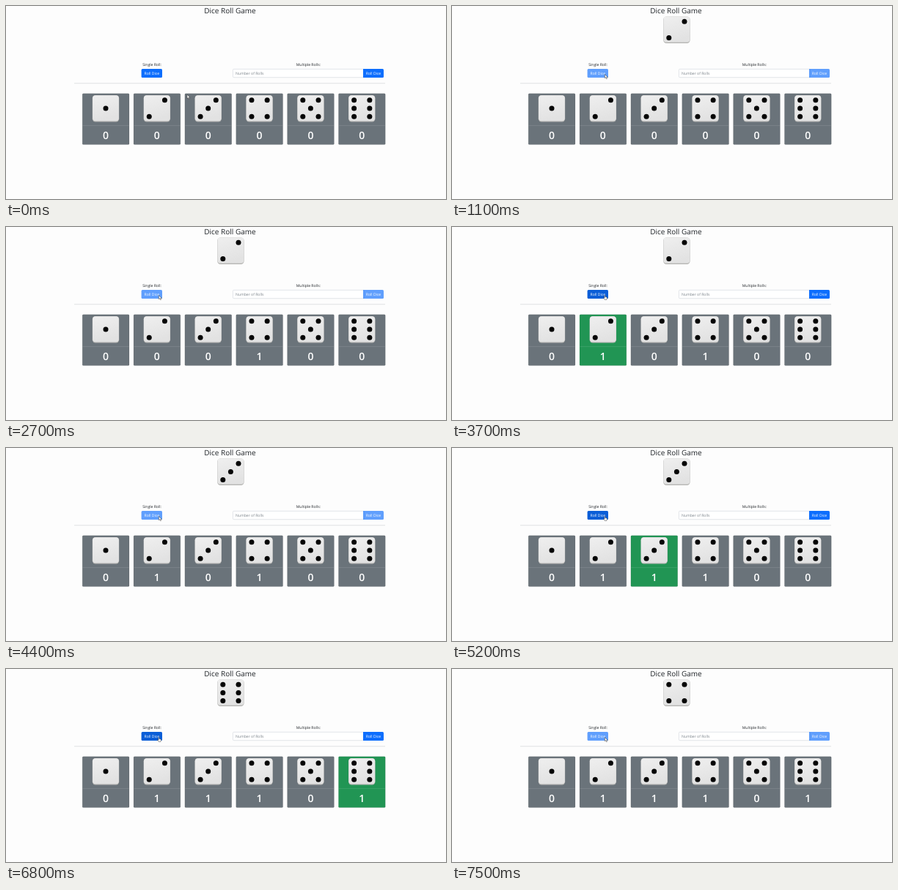
An HTML page for the animation above (7.6 s loop, 600 px wide and 264 px high).

```html
<!DOCTYPE html>
<html lang="en">
<head>
<meta charset="utf-8">
<title>Dice Roll Game</title>
<style>
  html, body { margin: 0; width: 100%; height: 100%; overflow: hidden; background: #fdfdfd; }
  svg { display: block; width: 600px; height: 264px; }
  text {
    font-family: "Open Sans", "Noto Sans", sans-serif;
    font-size: 5.1px;
    fill: #212529;
    text-anchor: middle;
    text-rendering: geometricPrecision;
  }
  .title { font-size: 10px; font-weight: 500; }
  .hint { fill: #7b838a; text-anchor: start; }
  .btn text { fill: #fff; }
  .count { font-size: 14px; font-weight: 600; fill: #fff; }
</style>
</head>
<body>
<svg id="stage" viewBox="0 0 600 264">
  <defs>
    <linearGradient id="face" x1="0" y1="0" x2="0.3" y2="1">
      <stop offset="0" stop-color="#efefef"/>
      <stop offset="1" stop-color="#e2e2e2"/>
    </linearGradient>
  </defs>
  <text class="title" x="305.5" y="10">Dice Roll Game</text>
  <text x="199" y="82.2">Single Roll:</text>
  <text x="412.3" y="82.2">Multiple Rolls:</text>
  <path d="M93 105.8H517" stroke="#d9dadb" stroke-width="0.8"/>
  <rect x="309.4" y="86.3" width="179" height="11.4" rx="1.4" fill="#fff" stroke="#ced4da" stroke-width="0.6"/>
  <text class="hint" x="313" y="93.9">Number of Rolls</text>
  <g class="btn" id="single">
    <rect x="184.6" y="86" width="28.4" height="12" rx="1.5"/>
    <text x="198.8" y="93.9">Roll Dice</text>
  </g>
  <g class="btn" id="multi">
    <path d="M487 86H513.5a1.5 1.5 0 0 1 1.5 1.5V96.5a1.5 1.5 0 0 1 -1.5 1.5H487Z"/>
    <text x="501" y="93.9">Roll Dice</text>
  </g>
  <g id="cards"></g>
  <g id="top"></g>
  <g id="pointer" stroke="#222" stroke-width="0.45" stroke-linejoin="round" fill="#fff">
    <path id="arrow" d="M0 0V5.4L1.3 4.3L2.2 6.3L3.1 5.9L2.2 4H3.9Z"/>
    <path id="hand" d="M-.5 .2Q0 -.4 .5 .2V2.2L2.6 2.7Q3.2 2.9 3.1 3.6L2.6 6H-.3L-1.9 3.9Q-1.6 3.2 -.5 3.9Z"/>
  </g>
</svg>
<script>
const LOOP = 7600, STEP = 100, FADE = 150, LEAD = 80;
const BLUE = [13, 110, 253], HOVER = [11, 94, 215];

// start and end in ms, one rolled face per step; the last face is the result
const rolls = [
  { start: 800,  end: 2000, faces: "516253113654" },
  { start: 2300, end: 3400, faces: "63512461532" },
  { start: 3800, end: 5000, faces: "51426135243" },
  { start: 5300, end: 6400, faces: "51446325136" },
  { start: 6900, end: 9999, faces: "2513654" }
];

const pips = {
  1: [[0, 0]],
  2: [[1, -1], [-1, 1]],
  3: [[1, -1], [0, 0], [-1, 1]],
  4: [[-1, -1], [1, -1], [-1, 1], [1, 1]],
  5: [[-1, -1], [1, -1], [0, 0], [-1, 1], [1, 1]],
  6: [[-1, -1], [1, -1], [-1, 0], [1, 0], [-1, 1], [1, 1]]
};

const el = id => document.getElementById(id);
const clamp = v => Math.max(0, Math.min(1, v));
const ease = v => v * v * (3 - 2 * v);
const mix = (a, b, k) => a + (b - a) * k;

function die(n, x, y) {
  const dots = pips[n].map(([px, py]) =>
    `<circle cx="${px * 10.6}" cy="${py * 11.2}" r="3.5" fill="#050505"/>`).join("");
  return `<g transform="translate(${x} ${y})">
    <rect x="-18.2" y="-18" width="36.4" height="36.5" rx="4.2" fill="#b9b9b7"/>
    <rect x="-17.9" y="-17.8" width="35.8" height="35" rx="4" fill="url(#face)"/>${dots}</g>`;
}

function card(n) {
  const x = 104 + (n - 1) * 69.85, mid = x + 32;
  return `<g>
    <rect class="bg" x="${x + .2}" y="119.7" width="63.8" height="69.9" rx="1.4" stroke="#000" stroke-opacity=".16" stroke-width=".6"/>
    <path d="M${x + .5} 163.6h63.2" stroke="#fff" stroke-opacity=".16" stroke-width=".7"/>
    ${die(n, mid, 140)}
    <text class="count" x="${mid}" y="182.2">0</text></g>`;
}

el("cards").innerHTML = [1, 2, 3, 4, 5, 6].map(card).join("");
el("top").innerHTML = [1, 2, 3, 4, 5, 6].map(n => die(n, 306.4, 32.4)).join("");
const cards = [...el("cards").children].map(g => ({
  bg: g.querySelector(".bg"), count: g.querySelector(".count")
}));
const tops = [...el("top").children];

function shade(id, rgb, opacity) {
  el(id).setAttribute("fill", `rgb(${rgb.map(Math.round)})`);
  el(id).setAttribute("opacity", opacity);
}

function draw(t) {
  const s = t + 10;
  const counts = [0, 0, 0, 0, 0, 0];
  let shown = 0, lit = 0, off = 0;
  for (const r of rolls) {
    const last = r.faces.length - 1;
    if (s >= r.start - LEAD) {
      lit = 0;
      off = clamp((s - r.start + LEAD) / FADE);
    }
    if (s >= r.start) shown = +r.faces[Math.min(last, Math.floor((s - r.start) / STEP))];
    if (s >= r.end) {
      lit = +r.faces[last];
      counts[lit - 1]++;
      off = 1 - clamp((s - r.end + 50) / FADE);
    }
  }

  tops.forEach((g, i) => g.setAttribute("visibility", i + 1 === shown ? "visible" : "hidden"));
  cards.forEach((c, i) => {
    c.bg.setAttribute("fill", i + 1 === lit ? "#219554" : "#6a737a");
    c.count.textContent = counts[i];
  });

  const hover = clamp((t - 500) / FADE) * (1 - off);
  const opacity = 1 - .35 * off;
  shade("single", BLUE.map((v, i) => mix(v, HOVER[i], hover)), opacity);
  shade("multi", BLUE, opacity);

  const k = ease(clamp((t - 50) / 600));
  el("pointer").setAttribute("transform", `translate(${mix(247, 208.4, k)} ${mix(121.2, 93.4, k)})`);
  const hand = t > 520 && off < .5;
  el("hand").setAttribute("visibility", hand ? "visible" : "hidden");
  el("arrow").setAttribute("visibility", hand ? "hidden" : "visible");
}

const begin = performance.now();
function tick() {
  draw((performance.now() - begin) % LOOP);
  requestAnimationFrame(tick);
}
draw(0);
requestAnimationFrame(tick);
</script>
</body>
</html>
```
